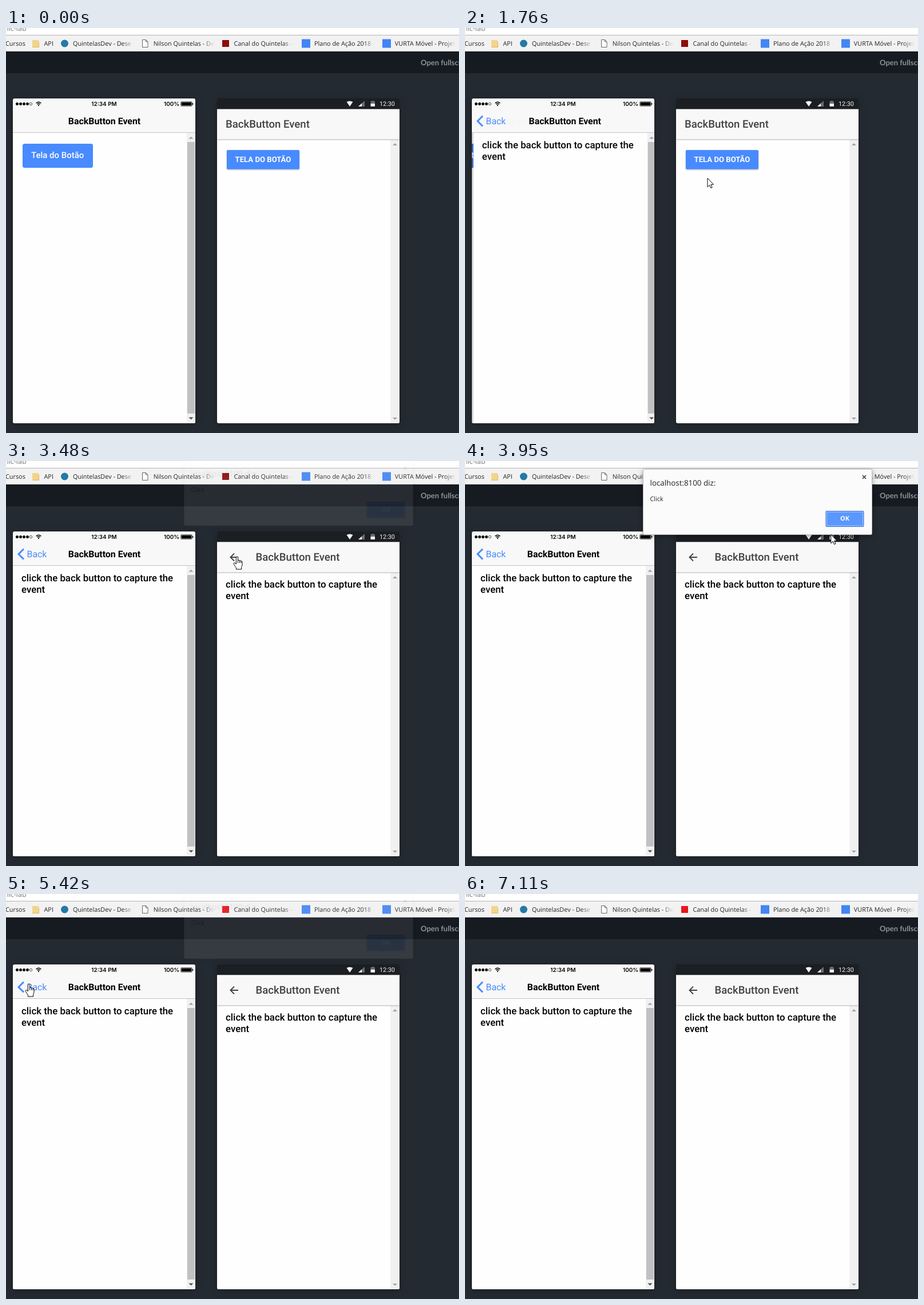
These frames come from a looping animation (792 by 707 pixels, 7570 ms). An HTML page:

```html
<!DOCTYPE html>
<html lang="pt">
<head>
<meta charset="utf-8">
<title>BackButton Event</title>
<style>
  html, body { margin: 0; width: 100%; height: 100%; overflow: hidden; background: #242a31; }
  svg { display: block; font-family: Roboto, sans-serif; text-rendering: geometricPrecision; }
  .chrome { font: 10.85px "Open Sans", sans-serif; fill: #222; }
  .title { font-size: 15.9px; font-weight: 700; text-anchor: middle; }
  .mdTitle { font-size: 18.6px; font-weight: 500; fill: #424242; }
  .body { font-size: 16.83px; font-weight: 500; }
  .status { font: 600 9.9px Inter, sans-serif; }
  .phone { filter: drop-shadow(0 2px 6px rgba(0,0,0,.25)); }
  .raised { filter: drop-shadow(0 1.5px 1px rgba(0,0,0,.3)); }
  .box { filter: drop-shadow(0 2px 4px rgba(0,0,0,.35)); }
</style>
</head>
<body>
<svg width="792" height="707" viewBox="0 0 792 707">
  <defs>
    <linearGradient id="fade"><stop stop-color="#f2f2f2" stop-opacity="0"/><stop offset="1" stop-color="#f2f2f2"/></linearGradient>
    <clipPath id="iosBody"><path d="M12 183h319v504a3 3 0 0 1-3 3H15a3 3 0 0 1-3-3z"/></clipPath>
    <clipPath id="iosNav"><rect x="12" y="142" width="319" height="40"/></clipPath>
    <clipPath id="mdBody"><path d="M369 141.700h319V687a3 3 0 0 1-3 3H372a3 3 0 0 1-3-3z"/></clipPath>
    <g id="iosScroll">
      <rect x="316" y="183" width="15" height="507" fill="#f1f1f1"/>
      <rect x="317" y="199" width="13" height="474" fill="#c1c1c1"/>
      <path d="M319.500 193.500l4-4 4 4z" fill="#a3a3a3"/>
      <path d="M319.500 679.500l4 4 4-4z" fill="#505050"/>
    </g>
    <g id="mdBase">
      <rect x="369" y="141" width="319" height="549" fill="#fefefe"/>
      <rect x="672" y="195" width="16" height="495" fill="#f1f1f1"/>
      <path d="M676 205l4-4 4 4zM676 680l4 4 4-4z" fill="#a3a3a3"/>
      <rect class="raised" x="369" y="141" width="319" height="53" fill="#f8f8f8"/>
    </g>
  </defs>

  <rect width="792" height="707" fill="#242a31"/>
  <rect y="40" width="792" height="39" fill="#161a21"/>
  <text x="725" y="65" font-family="Lato, sans-serif" font-size="13" font-weight="700" fill="#8d939a">Open fullscreen</text>
  <rect width="792" height="12" fill="#fff"/>
  <text x="-3" y="5" class="chrome" style="font-size:12.500px;fill:#777">nic-lab</text>
  <rect y="12" width="792" height="28.500" fill="#f2f2f2"/>
  <path d="M0 12.500H792" stroke="#b4b4b4"/>
  <path d="M0 40.500H792" stroke="#c9c9c9"/>
  <text class="chrome" x="-1" y="31">Cursos</text>
  <text class="chrome" x="66.500" y="31">API</text>
  <g id="bookmarks" class="chrome"></g>
  <path d="M46 21h11v13H46z" fill="#f3d48a"/><path d="M46 33.500h11M57.500 24v10" stroke="#dfba68"/>
  <circle cx="102.500" cy="27" r="6.500" fill="#2379a8"/>
  <path d="M238.500 20.500h6l3.500 3.500v9.500h-9.500zM244.500 20.500V24H248" fill="#fff" stroke="#666"/>
  <rect id="video" x="378" y="21" width="12" height="12"/>
  <path d="M517 19.500h15v15h-15zM658 19.500h15v15h-15z" fill="#4285f4"/>

  <rect class="phone" x="12" y="123" width="319" height="567" rx="3" fill="#f8f8f8"/>
  <g id="dots"></g>
  <g fill="none" stroke="#000" stroke-width="1.300"><path d="M52.500 131.300q4.500-4 9 0M54.300 133.200q2.700-2.400 5.400 0"/><circle cx="57" cy="135" r=".5"/></g>
  <text class="status" x="171.500" y="136" text-anchor="middle">12:34 PM</text>
  <text class="status" x="276" y="136">100%</text>
  <rect x="305.500" y="128.500" width="20" height="8" rx="1.500" fill="none" stroke="#555" stroke-width=".8"/>
  <path d="M306.500 129.500h18v6h-18zM326 131h1.200v3H326z"/>
  <g clip-path="url(#iosNav)">
    <text id="oldTitle" class="title" x="172" y="168">BackButton Event</text>
    <text id="newTitle" class="title" x="172" y="168">BackButton Event</text>
    <g id="back" fill="#488aff">
      <path d="M31 153.500l-9 9 9 9" fill="none" stroke="#488aff" stroke-width="3"/>
      <text x="36.500" y="168" font-size="15.900">Back</text>
    </g>
  </g>
  <path d="M12 182.500h319" stroke="#c4c4c4"/>
  <g clip-path="url(#iosBody)">
    <g id="iosOld">
      <rect x="12" y="183" width="319" height="507" fill="#fefefe"/>
      <rect id="iosButton" x="29" y="202" width="123" height="42" rx="3.500"/>
      <text x="44" y="227.300" font-size="14.960" font-weight="500" fill="#fff">Tela do Botão</text>
      <use href="#iosScroll"/>
      <rect id="dim" x="12" y="183" width="319" height="507"/>
    </g>
    <g id="iosNew">
      <rect x="12" y="183" width="319" height="507" fill="#fefefe"/>
      <g id="iosContent">
        <text class="body" x="27" y="209.700">click the back button to capture the<tspan x="27" dy="20">event</tspan></text>
        <use href="#iosScroll"/>
      </g>
    </g>
  </g>

  <rect class="phone" x="369" y="123" width="319" height="567" rx="3" fill="#1b1e22"/>
  <g fill="#f4f4f4">
    <path d="M595.500 129q5.500-3 11 0l-5.500 8z"/>
    <path d="M616 137l11-10v10z" fill="#6b6e71"/><path d="M616 137l6-5.500v5.500z"/>
    <path d="M637.500 128h2v-1h3.500v1h2v4h-7.500z" fill="#6b6e71"/><path d="M637.500 132h7.500v5h-7.500z"/>
    <text x="653" y="136" font-size="10.800">12:30</text>
  </g>
  <g clip-path="url(#mdBody)">
    <use href="#mdBase"/>
    <text class="mdTitle" x="384" y="174">BackButton Event</text>
    <rect class="raised" x="386" y="213" width="127" height="33.500" rx="2" fill="#488aff"/>
    <text x="449.500" y="233.800" font-size="13.150" font-weight="700" fill="#fff" text-anchor="middle">TELA DO BOTÃO</text>
    <g id="mdNew">
      <use href="#mdBase"/>
      <path d="M406 168h-13M399 161.500l-6.500 6.500 6.500 6.500" fill="none" stroke="#424242" stroke-width="1.900"/>
      <text class="mdTitle" x="436.500" y="174">BackButton Event</text>
      <text class="body" x="384" y="221.200">click the back button to capture the<tspan x="384" dy="20">event</tspan></text>
    </g>
  </g>

  <g id="dialog">
    <rect class="box" x="311.500" y="14.500" width="400" height="114" rx="2" fill="#fbfbfb" stroke="#bcbcbc"/>
    <text class="chrome" x="323.500" y="43" style="font-size:13.350px">localhost:8100 diz:</text>
    <text class="chrome" x="323.500" y="70">Click</text>
    <path d="M695 25l6 6M701 25l-6 6" stroke="#4b6260" stroke-width="1.800"/>
    <rect x="631" y="87.500" width="66" height="27" rx="1" fill="#5a97ff" stroke="#3f76d2"/>
    <rect x="632.500" y="89" width="63" height="24" fill="none" stroke="#a9c9ff"/>
    <text class="chrome" x="664" y="104.200" text-anchor="middle" style="fill:#fff;font-weight:700">OK</text>
  </g>

  <g id="cursor" fill="#fff" stroke="#000" stroke-linejoin="round">
    <path id="arrow" d="M.5 .5V16L4 12.600 6.300 17.800 8.700 16.800 6.400 11.600H11z"/>
    <path id="hand" d="M-1.600 1.600Q-1.600 0 0 0T1.600 1.600V6.500Q3 5.600 4.500 6.800 6 6.200 7 7.600 9 7.400 9 9.500V14Q8.500 17 7.500 18.500V22H-1.500V19.500Q-3.500 17-5.600 13.200-6.500 11-4.700 10.600-3 10.600-1.600 13ZM1.600 6.500V11M4.500 7V11M7 8V11"/>
  </g>
</svg>
<script>
const LOOP = 7570;
const BEAT = 79; // the screen refreshes once per beat while something moves
const LAG = 12;
const $ = id => document.getElementById(id);
const clamp = v => Math.max(0, Math.min(1, v));
const mix = (a, b, k) => a + (b - a) * k;
const move = (id, x, y = 0) => $(id).setAttribute('transform', `translate(${x} ${y})`);
const fade = (id, alpha) => $(id).setAttribute('opacity', +alpha);
const fill = (id, color) => $(id).setAttribute('fill', color);

const labels = ['QuintelasDev - Dese', 'Nilson Quintelas - De', 'Canal do Quintelas - ', 'Plano de Ação 2018 - ', 'VURTA Móvel - Projeto'];
$('bookmarks').innerHTML = labels.map((label, i) => {
  const x = 117 + 140.7 * i;
  return `<text x="${x}" y="31">${label}</text>
    <rect x="${x + 86}" y="18" width="20" height="18" fill="url(#fade)"/>
    <rect x="${x + 106}" y="18" width="14" height="18" fill="#f2f2f2"/>`;
}).join('');
$('dots').innerHTML = [0, 1, 2, 3, 4].map(i =>
  `<circle cx="${19.5 + 6 * i}" cy="132.500" r="2.200" stroke="#000" stroke-width=".7" fill="${i < 4 ? '#000' : 'none'}"/>`).join('');

const away = { x: 700, y: 720 };
const iosButton = { x: 105, y: 199, link: true };
const mdButton = { x: 462, y: 226, link: true };
const mdText = { x: 487, y: 252 };
const mdBack = { x: 404, y: 167, link: true };
const ok = { x: 673, y: 99 };
const iosBack = { x: 40, y: 157, link: true };

// Pointer trips; sag bends the way downwards
const trips = [
  { start: 380, span: 690, to: iosButton, sag: 0 },
  { start: 1300, span: 670, to: mdButton, sag: 100 },
  { start: 2230, span: 400, to: mdText, sag: 0 },
  { start: 2640, span: 540, to: mdBack, sag: 0 },
  { start: 3790, span: 280, to: ok, sag: 46 },
  { start: 4480, span: 700, to: iosBack, sag: 50 },
  { start: 5420, span: 700, to: ok, sag: 115 },
  { start: 6650, span: 390, to: away, sag: 0 }
];
const popups = [{ open: 3480, close: 4480 }, { open: 5420, close: 6650 }];

const beats = elapsed => Math.floor(elapsed / BEAT + .01);

// cubic-bezier(.36, .66, .04, 1)
function ease(x) {
  const bezier = (s, a, b) => 3 * (1 - s) ** 2 * s * a + 3 * (1 - s) * s * s * b + s ** 3;
  let low = 0, high = 1;
  for (let i = 0; i < 24; i++) {
    const mid = (low + high) / 2;
    if (bezier(mid, .36, .04) < x) low = mid; else high = mid;
  }
  return bezier(high, .66, 1);
}
function transition(t, start, span) {
  const x = clamp((beats(t - start) * BEAT - LAG) / span);
  return x > 0 ? ease(x) : 0;
}

function popupAlpha(t) {
  const popup = popups.findLast(({ open }) => t >= open);
  if (!popup) return 0;
  if (t >= popup.close) return Math.max(0, .5 - .4 * beats(t - popup.close));
  return beats(t - popup.open) ? 1 : .08;
}

function drawCursor(t) {
  const i = Math.max(0, trips.findLastIndex(({ start }) => t >= start));
  const { start, span, to, sag } = trips[i];
  const from = i ? trips[i - 1].to : away;
  const k = 1 - (1 - clamp(beats(t - start) * BEAT / span)) ** 2.5;
  move('cursor', mix(from.x, to.x, k), mix(from.y, to.y, k) + 4 * sag * k * (1 - k));
  const hand = k === 0 ? from.link : k > .95 && to.link;
  fade('hand', hand ? 1 : 0);
  fade('arrow', hand ? 0 : 1);
}

function render(t) {
  const push = transition(t, 1300, 500);
  move('iosOld', -105 * push);
  move('oldTitle', -105 * push);
  fade('oldTitle', 1 - push);
  fade('dim', .16 * push);
  fill('iosButton', push ? '#427feb' : '#488aff');
  move('iosNew', 319 * (1 - push));
  move('newTitle', 319 * (1 - push));
  fade('newTitle', push);
  for (const id of ['iosContent', 'back']) fade(id, clamp(2 * push - 1));

  const rise = transition(t, 2230, 280);
  move('mdNew', 0, 40 * (1 - rise));
  fade('mdNew', rise);

  const alpha = popupAlpha(t);
  fade('dialog', alpha);
  move('dialog', 0, -17 * (1 - alpha));
  fill('video', t < popups[0].close ? '#8e0c0c' : '#e8161b');

  drawCursor(t);
}

const begin = performance.now();
(function tick() {
  render((performance.now() - begin) % LOOP);
  requestAnimationFrame(tick);
})();
</script>
</body>
</html>
```
